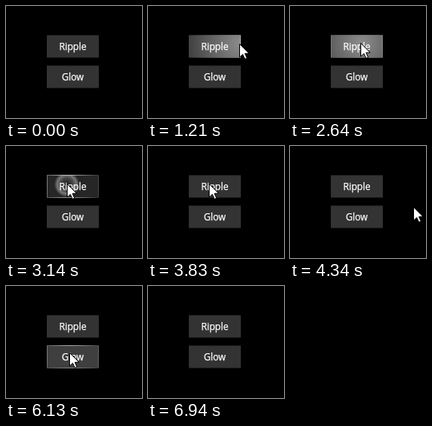
Animation, 170 px wide and 140 px high, one loop 7.19 s. Source, as an HTML page with a canvas:

```html
<!DOCTYPE html>
<html lang="en">
<head>
<meta charset="utf-8">
<title>Button effects</title>
<style>
html, body { margin: 0; width: 100%; height: 100%; overflow: hidden; background: #000; }
canvas { display: block; }
</style>
</head>
<body>
<canvas id="stage" width="170" height="140"></canvas>
<script>
const ctx = document.getElementById('stage').getContext('2d');
const LOOP = 7190;
const LEFT = 51, W = 65, H = 28;
const ripple = { y: 36.5, label: 'Ripple' };
const glow = { y: 74.5, label: 'Glow' };

const entry = { x: 123, y: 141 };
const moves = [
  { from: 925, to: 1210, x: 115, y: 47 },
  { from: 1210, to: 1980, x: 63, y: 56 },
  { from: 1980, to: 2380, x: 94, y: 46 },
  { from: 2400, to: 3090, x: 77, y: 47 },
  { from: 4080, to: 4340, x: 155, y: 76 },
  { from: 4340, to: 4830, x: 66, y: 84, dip: 14 },
  { from: 5020, to: 5180, x: 80, y: 83 },
  { from: 6600, to: 6935, x: 133, y: 141 }
];

const ramp = (t, a, b) => Math.max(0, Math.min(1, (t - a) / (b - a)));
const ease = u => u * u * (3 - 2 * u);
const mix = (a, b, u) => a + (b - a) * u;
const white = a => `rgba(255,255,255,${a})`;

function pointer(t) {
  if (t < moves[0].from || t >= moves[moves.length - 1].to) return null;
  let { x, y } = entry;
  for (const m of moves) {
    const u = ease(ramp(t, m.from, m.to));
    x = mix(x, m.x, u);
    y = mix(y, m.y, u) + (m.dip || 0) * Math.sin(Math.PI * u);
  }
  return { x, y };
}

function inside(button, p) {
  return p && p.x >= LEFT && p.x <= LEFT + W && p.y >= button.y && p.y <= button.y + H;
}

// Colours are spread evenly from the centre to radius r.
function radial(x, y, r, ...colors) {
  const g = ctx.createRadialGradient(x, y, 0, x, y, r);
  colors.forEach((c, i) => g.addColorStop(i / (colors.length - 1), c));
  return g;
}

function fillButton(button, style) {
  ctx.fillStyle = style;
  ctx.fillRect(LEFT, button.y, W, H);
}

function gray(level) {
  const v = Math.round(level);
  return `rgb(${v},${v},${v})`;
}

function label(button) {
  ctx.font = '500 11.7px "Open Sans", "Noto Sans", sans-serif';
  ctx.textAlign = 'center';
  ctx.fillStyle = ctx.strokeStyle = '#fff';
  ctx.lineWidth = 0.25;
  const x = LEFT + W / 2, y = button.y + 18.5;
  ctx.fillText(button.label, x, y);
  ctx.strokeText(button.label, x, y);
}

function edges(button, p, r, power) {
  const top = Math.floor(button.y);
  ctx.fillStyle = radial(p.x, p.y, r, white(power), white(power * 0.5), white(0));
  ctx.fillRect(LEFT, top, W, 1);
  ctx.fillRect(LEFT, top + H, W, 1);
  ctx.fillRect(LEFT, top + 1, 1, H - 1);
  ctx.fillRect(LEFT + W - 1, top + 1, 1, H - 1);
}

function drawRipple(t, p) {
  const press = 3125, spread = ramp(t, press, 3360), release = ramp(t, 3770, 3830);
  const pressed = t >= press && release < 1;
  fillButton(ripple, pressed ? gray(mix(38, 51, release)) : '#333');
  if (t < press && inside(ripple, p)) {
    fillButton(ripple, radial(p.x, p.y, 76, white(0.44), white(0)));
    edges(ripple, p, 70, 0.3);
  }
  if (pressed) {
    edges(ripple, p, 48, 0.8 * (1 - release));
    const a = 0.4 * (1 - spread);
    fillButton(ripple, radial(76, 48, 12 + 56 * spread,
      white(0), white(a * 0.15), white(a * 0.4), white(a), white(0)));
  }
  label(ripple);
}

function drawGlow(t, p) {
  const hover = inside(glow, p);
  const dip = t < 6000 ? ramp(t, 5340, 5430) * (t < 5640) : Math.sin(Math.PI * ramp(t, 6060, 6280));
  fillButton(glow, hover ? gray(mix(78, 60, dip)) : '#333');
  if (hover) edges(glow, p, 48, 0.7);
  label(glow);
}

function drawPointer(p) {
  const shape = [[0, 0], [0, 16.5], [3.9, 12.9], [6.6, 18.8], [9.2, 17.7], [6.6, 11.9], [11.7, 11.6]];
  const x = Math.round(p.x) - 0.5, y = Math.round(p.y) + 0.5;
  ctx.beginPath();
  for (const [dx, dy] of shape) ctx.lineTo(x + dx, y + dy);
  ctx.closePath();
  ctx.fillStyle = '#fff';
  ctx.fill();
  ctx.strokeStyle = '#000';
  ctx.lineWidth = 1;
  ctx.stroke();
}

function draw(t) {
  ctx.fillStyle = '#000';
  ctx.fillRect(0, 0, 170, 140);
  const p = pointer(t);
  drawRipple(t, p);
  drawGlow(t, p);
  if (p) drawPointer(p);
}

const start = performance.now();
function tick() {
  draw((performance.now() - start) % LOOP);
  requestAnimationFrame(tick);
}
tick();
</script>
</body>
</html>
```
